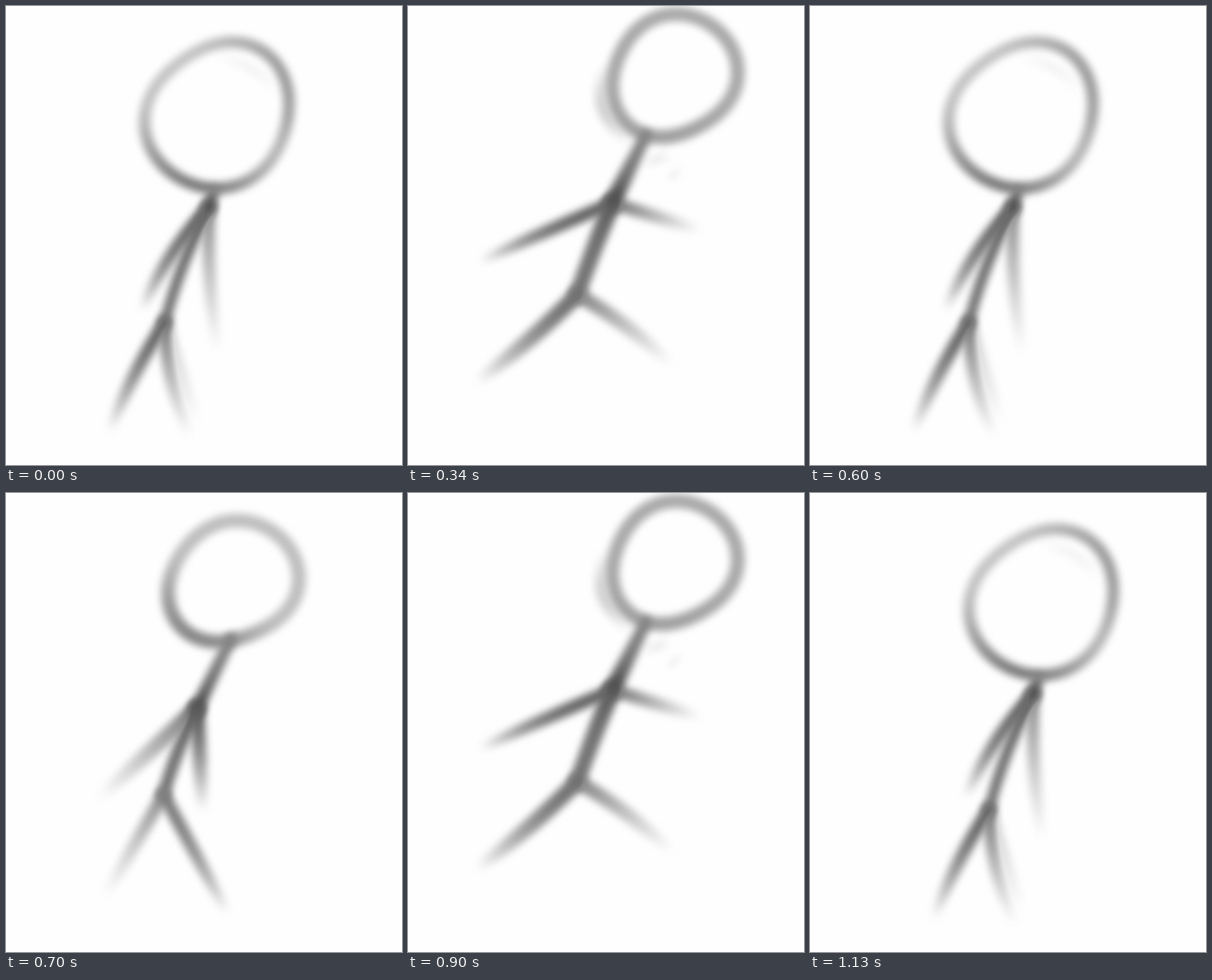
Write an HTML page with a canvas that moves like this. It is 566 px wide and 657 px high and loops after 1.2 s.

```html
<!DOCTYPE html>
<html lang="en">
<head>
<meta charset="utf-8">
<title>Jumping stick figure</title>
<style>
  html, body { margin: 0; width: 100%; height: 100%; overflow: hidden; background: #fefefe; }
  canvas { display: block; }
</style>
</head>
<body>
<canvas id="stage" width="566" height="657"></canvas>
<script>
const W = 566, H = 657, PAPER = 254, LOOP = 1200, FLOOR = 621;
const stage = document.getElementById('stage').getContext('2d');

function newLayer() {
  const canvas = document.createElement('canvas');
  canvas.width = W;
  canvas.height = H;
  return canvas.getContext('2d');
}

// Soft pencil mark: position, width and darkness (percent) are functions of t in 0..1.
function stroke(ctx, path, width, darkness) {
  const layer = newLayer(), steps = 400;
  for (let i = 0; i <= steps; i++) {
    const t = i / steps;
    const shade = PAPER * (1 - darkness(t) / 100);
    layer.fillStyle = `rgb(${shade},${shade},${shade})`;
    layer.beginPath();
    layer.arc(...path(t), width(t) / 2, 0, 2 * Math.PI);
    layer.fill();
  }
  ctx.filter = 'blur(5.4px)';
  ctx.globalCompositeOperation = 'darken';
  ctx.drawImage(layer.canvas, 0, 0);
}

// Parabolic arc between two points; bow is the sideways offset of its middle.
function arc([x0, y0], [x1, y1], bow = 0) {
  const dx = x1 - x0, dy = y1 - y0, length = Math.hypot(dx, dy);
  return t => {
    const offset = 4 * t * (1 - t) * bow / length;
    return [x0 + dx * t - dy * offset, y0 + dy * t + dx * offset];
  };
}

// Slightly stretched circle with three soft corners, darker at the chin and on one side.
function drawHead(ctx, { x, y, r, stretch, axis, corner, light, chin, chinAt, side = 0, width = 19 }) {
  const rad = Math.PI / 180;
  const lobe = (angle, centre) => Math.max(0, Math.cos(angle - centre * rad)) ** 2;
  const path = t => {
    const a = t * 2 * Math.PI;
    const radius = r * (1 + stretch * Math.cos(2 * (a - axis * rad))
      + 0.03 * Math.cos(3 * (a - corner * rad)));
    return [x + radius * Math.cos(a), y + radius * Math.sin(a)];
  };
  const darkness = t => {
    const a = t * 2 * Math.PI;
    return light + chin * lobe(a, chinAt) + side * lobe(a, -25);
  };
  stroke(ctx, path, () => width, darkness);
}

function drawTorso(ctx, { neck, shoulder, hip, bow, width = 19 }) {
  const joint = 68, body = 53;
  stroke(ctx, arc(neck, shoulder), t => 16 + (width - 16) * t, t => 48 + (joint - 48) * t ** 3);
  stroke(ctx, arc(shoulder, hip, bow), t => width - 2 * t, t => body + (joint - body) * (1 - t) ** 3);
}

// A high fade keeps the limb dark until close to its tip.
function drawLimb(ctx, from, { tip, bow = 0, dark, fade = 1, width = 18 }) {
  stroke(ctx, arc(from, tip, bow), t => width * (1 - 0.6 * t ** 4), t => dark * (1 - t ** fade));
}

function drawSmudge(ctx, { from, to, bow, dark, width }) {
  stroke(ctx, arc(from, to, bow), () => width, t => dark * Math.sin(Math.PI * t));
}

function drawPose({ head, torso, arms, legs, smudges = [] }) {
  const ctx = newLayer();
  ctx.fillStyle = '#fefefe';
  ctx.fillRect(0, 0, W, H);
  smudges.forEach(smudge => drawSmudge(ctx, smudge));
  drawHead(ctx, head);
  drawTorso(ctx, torso);
  arms.forEach(arm => drawLimb(ctx, torso.shoulder, arm));
  legs.forEach(leg => drawLimb(ctx, torso.hip, leg));
  return ctx.canvas;
}

const crouch = drawPose({
  head: { x: 304, y: 157, r: 103, stretch: 0.06, axis: -48, corner: -58,
    light: 23, chin: 28, chinAt: 112, side: 15, width: 17 },
  torso: { neck: [297, 266], shoulder: [290, 288], hip: [227, 453], bow: 5, width: 17 },
  arms: [
    { tip: [193, 438], bow: 8, dark: 58, fade: 3 },
    { tip: [303, 500], bow: 5, dark: 45 }
  ],
  legs: [
    { tip: [147, 612], bow: 5, dark: 60, fade: 2 },
    { tip: [265, 620], bow: 9, dark: 55 },
    { tip: [273, 600], bow: 0, dark: 14, fade: 2 }
  ],
  smudges: [{ from: [305, 74], to: [388, 125], bow: -10, dark: 5, width: 10 }]
});

const rise = drawPose({
  head: { x: 324, y: 127, r: 89, stretch: 0.08, axis: -30, corner: 135,
    light: 25, chin: 21, chinAt: 130, width: 20 },
  torso: { neck: [322, 208], shoulder: [273, 308], hip: [225, 432], bow: 3 },
  arms: [
    { tip: [130, 440], dark: 55, width: 22 },
    { tip: [281, 460], dark: 65, fade: 1.5, width: 20 }
  ],
  legs: [
    { tip: [140, 580], dark: 45 },
    { tip: [318, 604], dark: 50, fade: 2.5 }
  ]
});

const peak = drawPose({
  head: { x: 380, y: 100, r: 88, stretch: 0.06, axis: -40, corner: 130,
    light: 33, chin: 4, chinAt: 110, width: 20 },
  torso: { neck: [340, 185], shoulder: [292, 282], hip: [242, 413], bow: 1, width: 24 },
  arms: [
    { tip: [100, 367], bow: 1, dark: 60, fade: 3 },
    { tip: [422, 322], dark: 58 }
  ],
  legs: [
    { tip: [95, 540], bow: -4, dark: 55, fade: 2, width: 22 },
    { tip: [380, 516], bow: -5, dark: 50, width: 20 }
  ],
  smudges: [
    { from: [316, 192], to: [290, 78], bow: -27, dark: 17, width: 16 },
    { from: [340, 225], to: [380, 211], bow: 0, dark: 8, width: 10 },
    { from: [373, 249], to: [392, 230], bow: 0, dark: 8, width: 6 }
  ]
});

const drift = drawPose({
  head: { x: 350, y: 106, r: 92, stretch: 0.08, axis: -28, corner: 135,
    light: 22, chin: 27, chinAt: 118, side: 23 },
  torso: { neck: [330, 194], shoulder: [280, 274], hip: [219, 430], bow: 4 },
  arms: [
    { tip: [132, 405], bow: 10, dark: 65 },
    { tip: [343, 420], dark: 70, width: 20 }
  ],
  legs: [
    { tip: [118, 554], bow: -9, dark: 56 },
    { tip: [367, 568], bow: 1, dark: 60, fade: 2 }
  ]
});

// [start time, pose, horizontal shift]
const timeline = [
  [0, crouch, 0], [170, rise, 0], [340, peak, 0], [470, drift, 0], [600, crouch, 0],
  [700, rise, 0], [800, drift, 0], [900, peak, 0], [1030, drift, 0], [1130, crouch, 29]
];

const start = performance.now();

function render(now) {
  const time = Math.max(0, now - start) % LOOP;
  const [, pose, shift] = timeline.filter(step => step[0] <= time).pop();
  stage.fillStyle = '#fefefe';
  stage.fillRect(0, 0, W, H);
  stage.drawImage(pose, shift, 0);
  stage.fillRect(0, FLOOR, W, H - FLOOR);
  requestAnimationFrame(render);
}
render(start);
</script>
</body>
</html>
```
